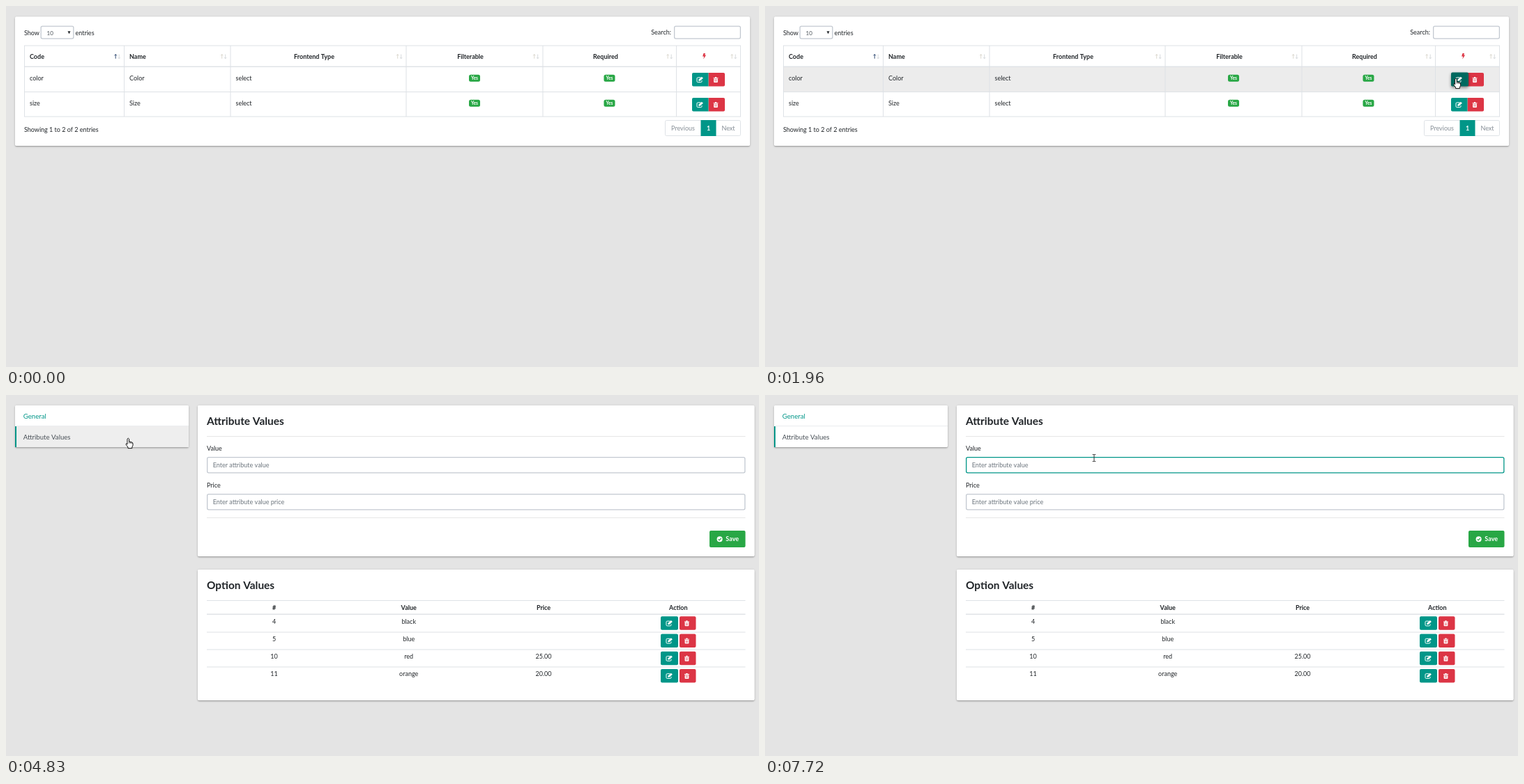
Recreate the animation shown at these times as an HTML page with a canvas. Size 1080 by 519 pixels, loop 8000 ms.

```html
<!DOCTYPE html>
<html lang="en">
<head>
<meta charset="utf-8">
<title>Attribute editor</title>
<style>
  html, body { margin: 0; width: 100%; height: 100%; overflow: hidden; background: #e4e4e4; }
  canvas { display: block; width: 1080px; height: 519px; }
</style>
</head>
<body>
<canvas id="stage" width="1080" height="519"></canvas>
<script>
const ctx = document.getElementById('stage').getContext('2d');
const LOOP = 8000;
const INK = '#212529', MUTED = '#6c757d', FIELD_INK = '#495057', LINE = '#dee2e6', EDGE = '#c3c9d1';
const TEAL = '#009688', DARK_TEAL = '#00695f', RED = '#dc3545', GREEN = '#28a745', HOVER = '#ececec';

// ---------- Drawing helpers ----------
function text(str, x, y, { size = 9, color = INK, bold = false, align = 'left' } = {}) {
  ctx.font = `${bold ? 700 : 400} ${size}px Lato, sans-serif`;
  ctx.textAlign = align;
  ctx.fillStyle = color;
  ctx.fillText(str, x, y + size * 0.36);
}

function rect(x, y, w, h, color) {
  ctx.fillStyle = color;
  ctx.fillRect(x, y, w, h);
}

function rounded(x, y, w, h, r, color) {
  ctx.beginPath();
  ctx.roundRect(x, y, w, h, r);
  ctx.fillStyle = color;
  ctx.fill();
}

function shadowed(dy, blur, alpha, draw) {
  ctx.save();
  ctx.shadowColor = `rgba(0,0,0,${alpha})`;
  ctx.shadowOffsetY = dy;
  ctx.shadowBlur = blur;
  draw();
  ctx.restore();
}

function card(x, y, w, h) {
  const body = () => rounded(x, y, w, h, 2, '#fff');
  shadowed(1.3, 1.5, 0.22, body);
  shadowed(0.7, 3.5, 0.16, body);
}

function field(x, y, w, h, edge = EDGE) {
  ctx.beginPath();
  ctx.roundRect(x + 0.65, y + 0.65, w - 1.3, h - 1.3, 2);
  ctx.fillStyle = '#fff';
  ctx.fill();
  ctx.strokeStyle = edge;
  ctx.lineWidth = 1.3;
  ctx.stroke();
}

function path(d, x, y, { fill, stroke, width = 1 }) {
  ctx.save();
  ctx.translate(x, y);
  const shape = new Path2D(d);
  if (fill) { ctx.fillStyle = fill; ctx.fill(shape); }
  if (stroke) {
    ctx.strokeStyle = stroke;
    ctx.lineWidth = width;
    ctx.lineJoin = 'round';
    ctx.stroke(shape);
  }
  ctx.restore();
}

const rule = (y, x = 288, w = 772.5) => rect(x, y, w, 1, '#e6e6e6');
const dropArrow = (x, y) => path('M-2 -2H2L0 2Z', x, y, { fill: INK });

// ---------- Icons ----------
function editIcon(x, y) {
  path('M1.5 -3.2H-2.6Q-4 -3.2 -4 -2V2.4Q-4 3.6 -2.6 3.6H1.7Q3 3.6 3 2.4V1', x, y, { stroke: '#fff' });
  path('M-1.6 1.8V-.2L2.9 -4.2L4.9 -2.2L.4 1.8Z', x, y, { fill: '#fff' });
}

function trashIcon(x, y) {
  path('M-3.5 -2.8H-1.4L-.9 -4H.9L1.4 -2.8H3.5V-1.9H-3.5Z M-2.9 -1.5H2.9V3Q2.9 4 1.9 4H-1.9Q-2.9 4 -2.9 3Z', x, y, { fill: '#fff' });
  path('M-1.2 -.5V2.8M0 -.5V2.8M1.2 -.5V2.8', x, y, { stroke: RED, width: 0.5 });
}

function checkIcon(x, y) {
  ctx.beginPath();
  ctx.arc(x, y, 4, 0, Math.PI * 2);
  ctx.fillStyle = '#fff';
  ctx.fill();
  path('M-2 0L-.5 1.5L2.1 -1.3', x, y, { stroke: GREEN, width: 1.2 });
}

const backIcon = (x, y) => path('M4 0H-3M0 -3.4L-3.4 0L0 3.4', x, y, { stroke: '#fff', width: 1.6 });

function sortIcon(x, y, ascending) {
  path('M-2 3.2V-3M-3.6 -1.2L-2 -3L-.4 -1.2', x, y, { stroke: ascending ? '#1d3a66' : '#d9d5cb', width: 0.9 });
  path('M3 -3V3.2M1.4 1.4L3 3.2L4.6 1.4', x, y, { stroke: '#d3d6da', width: 0.9 });
}

// ---------- Attribute list ----------
const COLS = [26, 169, 321.5, 573.5, 769.5, 961, 1053];
const ROWS = [
  { code: 'color', name: 'Color', top: 88, bottom: 123 },
  { code: 'size', name: 'Size', top: 124, bottom: 159 },
];

function listPage(cursor) {
  card(13, 15.5, 1054, 185.5);
  text('Show', 26, 38.3);
  field(49.5, 28.5, 48, 19);
  text('10', 58.5, 38.7, { size: 8, color: FIELD_INK });
  dropArrow(90.5, 38.2);
  text('entries', 99.5, 38.3);
  text('Search:', 954, 37.6, { align: 'right' });
  field(958, 28.5, 96, 19);

  const hit = (left, right, top, bottom) =>
    cursor && cursor.x >= left && cursor.x < right && cursor.y >= top && cursor.y <= bottom;

  for (const row of ROWS) {
    if (hit(26, 1054, row.top, row.bottom)) rect(26, row.top, 1028, row.bottom - row.top, HOVER);
  }
  for (const x of COLS) rect(x, 57, 1, 102, LINE);
  for (const y of [56.5, 123, 158.5]) rect(26, y, 1028, 1, LINE);
  rect(26, 86.5, 1028, 1.4, LINE);

  const bold = { bold: true };
  const centred = { bold: true, align: 'center' };
  text('Code', 34, 72.5, bold);
  text('Name', 177, 72.5, bold);
  text('Frontend Type', 442, 72.5, centred);
  text('Filterable', 666, 72.5, centred);
  text('Required', 860, 72.5, centred);
  path('M-1 -4H1.6L.6 -1.4H2.6L-1.2 4.4L-.3 .4H-2.4Z', 1001.5, 72, { fill: RED });
  COLS.slice(1).forEach((x, i) => sortIcon(x - 9.8, 72.5, i === 0));

  for (const row of ROWS) {
    const y = row.top + 15.3, top = row.top + 8;
    text(row.code, 34, y);
    text(row.name, 177, y);
    text('select', 329.5, y);
    for (const x of [672, 865.5]) {
      rounded(x - 8, y - 4.5, 16, 10, 2.5, GREEN);
      text('Yes', x, y + 0.5, { size: 6.75, color: '#fff', bold: true, align: 'center' });
    }
    rounded(1007.5, top, 23.5, 19.5, [0, 2, 2, 0], RED);
    if (hit(984, 1008, top, top + 19.5)) {
      shadowed(2, 4, 0.45, () => rounded(984, top - 0.5, 25, 20, 2, DARK_TEAL));
    } else {
      rounded(984, top, 23.5, 19.5, [2, 0, 0, 2], TEAL);
    }
    editIcon(995, top + 10);
    trashIcon(1018, top + 10);
  }

  text('Showing 1 to 2 of 2 entries', 26, 178);
  ctx.strokeStyle = LINE;
  ctx.lineWidth = 1;
  ctx.beginPath();
  ctx.roundRect(945.5, 164.5, 108, 22, 2);
  ctx.stroke();
  rect(996.5, 164, 22, 23, TEAL);
  text('Previous', 971, 176, { color: '#868e96', align: 'center' });
  text('1', 1007.5, 176, { color: '#fff', align: 'center', bold: true });
  text('Next', 1036, 176, { color: '#868e96', align: 'center' });
}

// ---------- Attribute pages ----------
function sidebar(active, cursor) {
  card(13, 15, 249, 60);
  ['General', 'Attribute Values'].forEach((label, i) => {
    const top = 15 + i * 30;
    const hovered = cursor.x >= 13 && cursor.x < 262 && cursor.y >= top && cursor.y < top + 30;
    if (hovered) rect(13, top, 249, 30, '#eee');
    if (i === active) rect(13, top, 2, 30, TEAL);
    const color = i === active ? FIELD_INK : hovered ? DARK_TEAL : TEAL;
    text(label, 24.7, top + 15.7, { size: 9.65, color });
  });
  rect(15, 44.3, 247, 0.8, '#e4e7ea');
}

function title(str, y) {
  text(str, 288, y, { size: 15.43, bold: true });
}

function labelled(label, value, y, { edge, color = FIELD_INK, indent = 8.7 } = {}) {
  text(label, 288, y);
  field(288, y + 12, 772.5, 23.5, edge);
  text(value, 288 + indent, y + 24, { color });
}

function button(label, x, y, w, color, icon, textX) {
  rounded(x, y, w, 24, 2, color);
  icon(textX - 8.7, y + 12.3);
  text(label, textX, y + 12.2, { color: '#fff', bold: true });
}

function checkbox(label, y) {
  ctx.beginPath();
  ctx.roundRect(288.5, y - 3.5, 7, 7, 1);
  ctx.fillStyle = '#f4f4f4';
  ctx.fill();
  ctx.strokeStyle = '#9a9a9a';
  ctx.lineWidth = 0.9;
  ctx.stroke();
  path('M-2.2 0L-.6 1.8L2.3 -2.1', 292, y, { stroke: '#222', width: 1.4 });
  text(label, 300.7, y);
}

function generalPage(cursor) {
  sidebar(0, cursor);
  card(275, 15, 798.5, 317);
  title('Attribute Information', 37);
  rule(59);
  labelled('Code', 'color', 77);
  labelled('Name', 'Color', 130);
  labelled('Frontend Type', 'Select Box', 183, { indent: 11 });
  dropArrow(1053.3, 206.5);
  checkbox('Filterable', 236.5);
  checkbox('Required', 260.3);
  rule(277);
  button('Update Attribute', 890, 296, 103, GREEN, checkIcon, 913);
  button('Go Back', 994, 296, 66.5, RED, backIcon, 1017.7);
}

const OPTIONS = [['4', 'black', ''], ['5', 'blue', ''], ['10', 'red', '25.00'], ['11', 'orange', '20.00']];
const OPTION_X = [384.5, 577.7, 771, 964.3];

function mixEdge(p) {
  const from = [195, 201, 209], to = [0, 150, 136];
  return `rgb(${from.map((c, i) => Math.round(c + (to[i] - c) * p))})`;
}

function valuesPage(cursor, t) {
  sidebar(1, cursor);
  card(275, 15, 798.5, 217);
  title('Attribute Values', 37);
  rule(59);
  const focus = t < 6090 ? 0 : Math.min(1, (Math.floor((t - 6090) / 75) + 1) / 3);
  labelled('Value', 'Enter attribute value', 77, { color: MUTED, edge: mixEdge(focus) });
  labelled('Price', 'Enter attribute value price', 130, { color: MUTED });
  const caretOn = (t >= 6090 && t < 6640) || (t >= 7200 && t < 7720);
  if (caretOn) rect(297, 95, 1, 11, FIELD_INK);
  rule(176);
  button('Save', 1009, 195, 51.5, GREEN, checkIcon, 1032.3);

  card(275, 251, 798.5, 188);
  title('Option Values', 273);
  rect(288, 295, 772.5, 1, LINE);
  rect(288, 314.5, 772.5, 1.4, LINE);
  ['#', 'Value', 'Price', 'Action'].forEach((label, i) =>
    text(label, OPTION_X[i], 305.5, { bold: true, align: 'center' }));
  OPTIONS.forEach((cells, i) => {
    const top = 315.3 + i * 25.2;
    if (i) rect(288, Math.round(top) - 0.5, 772.5, 1, LINE);
    cells.forEach((cell, j) => text(cell, OPTION_X[j], top + 10.3, { align: 'center' }));
    rounded(939, top + 3, 25, 19.5, 2, TEAL);
    rounded(966, top + 3, 23.5, 19.5, 2, RED);
    editIcon(951, top + 13);
    trashIcon(976.5, top + 13);
  });
}

// ---------- Cursor ----------
const smooth = p => (1 - Math.cos(Math.PI * p)) / 2;
const linear = p => p;
const MOVES = [
  { start: 250, end: 1030, steps: 11, ease: smooth, points: [[1006, 427], [900, 345], [823, 235], [858, 162]] },
  { start: 1120, end: 1880, steps: 11, ease: smooth, points: [[858, 162], [925, 137], [991, 104]] },
  { start: 2880, end: 3660, steps: 11, ease: smooth, points: [[991, 104], [780, 133], [480, 137], [172, 72]] },
  { start: 3760, end: 3920, steps: 3, ease: linear, points: [[172, 72], [152, 60]] },
  { start: 4830, end: 5550, steps: 10, ease: smooth, points: [[152, 60], [560, 95], [1036, 135], [760, 152], [509, 131]] },
  { start: 5720, end: 5940, steps: 4, ease: linear, points: [[509, 131], [502, 117], [490, 105], [478, 95], [472, 90.5]] },
];

// Catmull-Rom curve through the points
function along(points, p) {
  const last = points.length - 1;
  const i = Math.min(last - 1, Math.floor(p * last)), u = p * last - i;
  const at = (k, axis) => points[Math.max(0, Math.min(last, k))][axis];
  const [x, y] = [0, 1].map(axis => {
    const a = at(i - 1, axis), b = at(i, axis), c = at(i + 1, axis), d = at(i + 2, axis);
    return b + u * ((c - a) + u * ((2 * a - 5 * b + 4 * c - d) + u * (3 * b - a - 3 * c + d))) / 2;
  });
  return { x, y };
}

function cursorAt(t) {
  const move = MOVES.filter(m => t >= m.start).pop();
  if (!move) return null;
  const { start, end, steps, ease, points } = move;
  const step = Math.min(steps, Math.floor((t - start) / (end - start) * (steps - 1) + 1e-6) + 1);
  const p = move === MOVES[0] ? (step - 1) / (steps - 1) : step / steps;
  return along(points, ease(p));
}

function cursorKind(t, { x, y }) {
  if (t < 2570) {
    const overButton = x > 984 && x < 1031 && ((y > 96 && y < 115) || (y > 131 && y < 151));
    return overButton ? 'hand' : 'arrow';
  }
  if (t < 2880) return 'hand';
  if (x < 262 && y > 15 && y < 75) return 'hand';
  const overField = x > 288 && x < 1060 && ((y > 89 && y < 112.5) || (y > 142 && y < 165.5));
  return overField ? 'beam' : 'arrow';
}

function drawCursor(kind, { x, y }) {
  if (kind === 'hand') {
    path('M-1.4 1.2Q0 -.9 1.2 1.2V5L5 5.9Q6.6 6.3 6.6 8V10.5L5.4 12.8V14.6H-.4V13L-3.2 9.4Q-3.6 7.8 -2.4 7.8L-1.4 8.9Z',
      x, y, { fill: '#fff', stroke: '#111', width: 1 });
    path('M1.2 5V7.6M3.1 5.6V7.8M4.9 6V8', x, y, { stroke: '#111', width: 0.7 });
  } else if (kind === 'beam') {
    path('M-2.2 -5H-.6L0 -4.5L.6 -5H2.2M0 -4.5V4.5M-2.2 5H-.6L0 4.5L.6 5H2.2', x, y, { stroke: '#333', width: 1 });
  } else {
    path('M.5 .6V11L2.8 8.9L4.5 12.7L6.1 12L4.4 8.3H7.5Z', x, y, { fill: '#fff', stroke: '#111', width: 0.9 });
  }
}

// ---------- Timeline ----------
function draw(t) {
  rect(0, 0, 1080, 519, '#e4e4e4');
  const cursor = cursorAt(t);
  if (t < 2570) listPage(cursor);
  else if (t < 4450) generalPage(cursor);
  else valuesPage(cursor, t);
  if (!cursor) return;
  const clicking = (t >= 1880 && t < 1960) || (t >= 4280 && t < 4450);
  if (clicking) {
    ctx.beginPath();
    ctx.arc(cursor.x, cursor.y, 8, 0, Math.PI * 2);
    ctx.fillStyle = 'rgba(255,238,40,.72)';
    ctx.fill();
  }
  drawCursor(cursorKind(t, cursor), cursor);
}

const origin = performance.now();
function tick() {
  draw((performance.now() - origin) % LOOP);
  requestAnimationFrame(tick);
}
tick();
</script>
</body>
</html>
```
